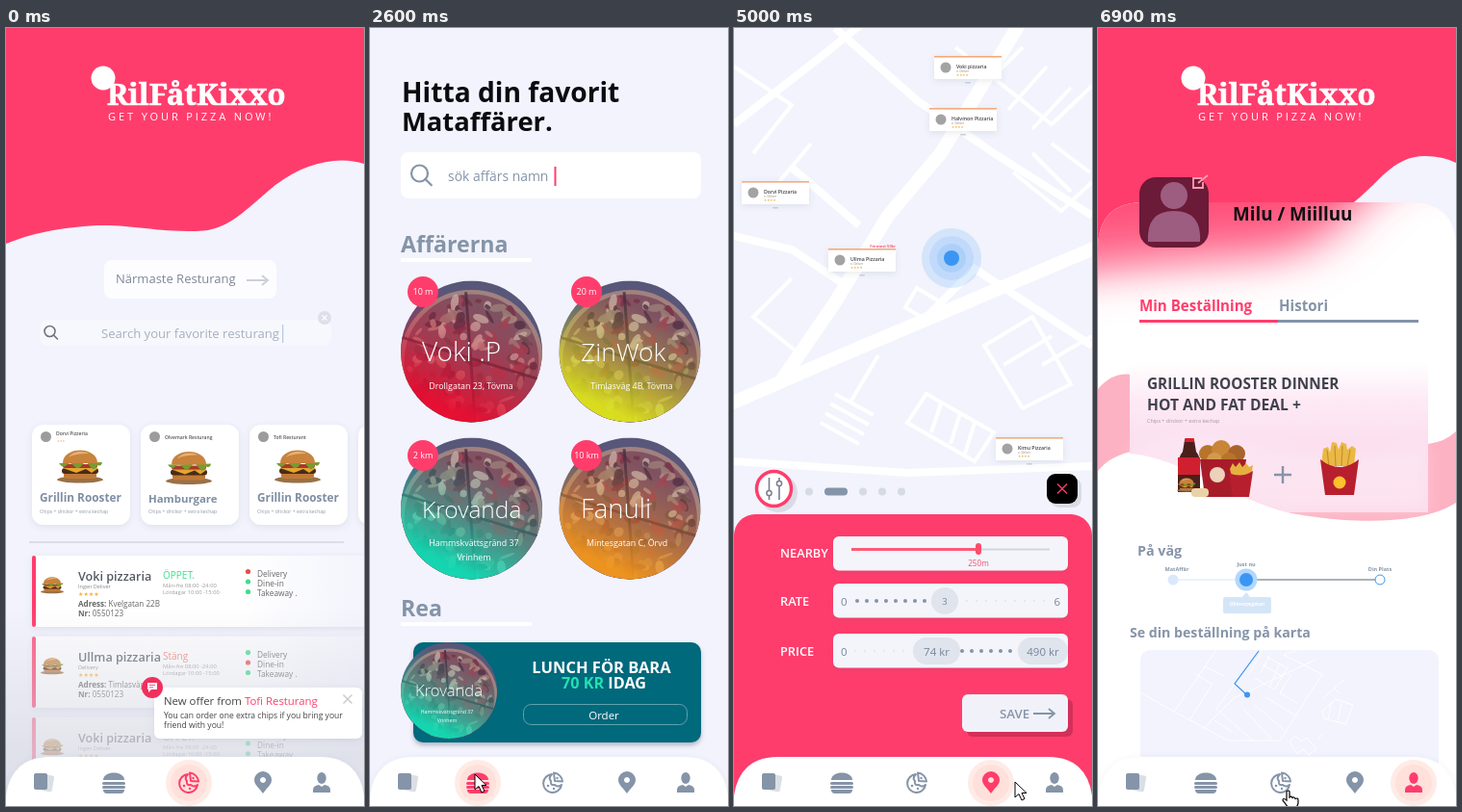
Animation of 372 by 808 pixels, one loop 7200 ms. Source, as an HTML page:

```html
<!DOCTYPE html>
<html lang="sv">
<head>
<meta charset="utf-8">
<title>Pizza app</title>
<style>
html, body { margin: 0; width: 100%; height: 100%; overflow: hidden; background: #f2f3fc; }
svg { display: block; font-family: "Open Sans", "Noto Sans", sans-serif; }
text { white-space: pre; }
.b { font-weight: 700; }
.s { font-weight: 600; }
.l { font-weight: 300; }
.m { text-anchor: middle; }
.e { text-anchor: end; }
.logo { font: 900 31px "Noto Serif", serif; stroke: #fff; stroke-width: .7; }
</style>
</head>
<body>
<svg id="stage" width="372" height="808" viewBox="0 0 372 808"></svg>
<script>
const PINK = '#ff3d6c', GREY = '#8594a8', BG = '#f2f3fc', BLUE = '#3b96f3', GREEN = '#3fdc8c';
const LOOP = 7200, STEP = 100, FADE = 380;

const text = (x, y, size, str, fill = GREY, cls = '') =>
  `<text x="${x}" y="${y}" font-size="${size}" fill="${fill}" class="${cls}">${str}</text>`;
const rect = (x, y, w, h, r, fill, extra = '') =>
  `<rect x="${x}" y="${y}" width="${w}" height="${h}" rx="${r}" fill="${fill}" ${extra}/>`;
const dot = (x, y, r, fill, extra = '') => `<circle cx="${x}" cy="${y}" r="${r}" fill="${fill}" ${extra}/>`;
const shape = (d, fill, extra = '') => `<path d="${d}" fill="${fill}" ${extra}/>`;
const line = (d, stroke, w, extra = '') => `<path d="${d}" fill="none" stroke="${stroke}" stroke-width="${w}" ${extra}/>`;
const at = (x, y, body, k = 1) => `<g transform="translate(${x} ${y}) scale(${k})">${body}</g>`;
const dots = (x, y, n, step, r, fill) => Array.from({ length: n }, (_, i) => dot(x + i * step, y, r, fill)).join('');
const SHADOW = 'filter="url(#shadow)"';

// Shared artwork
const tints = { red: '#ea0c30', yellow: '#dde31c', teal: '#0fdcb4', orange: '#f2961c' };
const stops = (...list) => list.map(([o, c, a = 1]) => `<stop offset="${o}" stop-color="${c}" stop-opacity="${a}"/>`).join('');
const gradient = (id, list, dir = 'x2="0" y2="1"') => `<linearGradient id="${id}" ${dir}>${stops(...list)}</linearGradient>`;

function toppings() {
  let seed = 7, out = '';
  const rnd = () => (seed = seed * 16807 % 2147483647) / 2147483647;
  const tones = ['#cf9a8a', '#84303f', '#dfc0ae', '#58303e', '#b04450', '#b08a7a', '#6f4a48'];
  for (let i = 0; i < 130; i++) {
    const a = rnd() * 6.28, d = Math.sqrt(rnd()) * 88;
    out += `<ellipse rx="${4 + rnd() * 9}" ry="${2 + rnd() * 5}" fill="${tones[i % 7]}" opacity=".85"
      transform="translate(${d * Math.cos(a)} ${14 + d * Math.sin(a)}) rotate(${rnd() * 180})"/>`;
  }
  return out;
}
const pizza = (x, y, r, tint) => at(x, y,
  `<g clip-path="url(#disc)"><use href="#pizza"/>${dot(0, 0, 100, `url(#${tint})`)}</g>`, r / 100);

const burger = (x, y, w) => at(x, y,
  `<ellipse cy="15" rx="24" ry="3.5" fill="#9a7047"/>` +
  rect(-17, 7, 34, 7, 3, '#c07a38') + rect(-19, 3, 38, 6, 3, '#4a2a1a') +
  shape('M-18 3H19L12 8L6 4L-4 8Z', '#e5a52e') + rect(-18, -1, 36, 4, 2, '#a83a28') +
  shape('M-22 -2q4 6 8 2t8 1t8 -1t8 1t8 -1q4 2 5 -3z', '#7a9a32') +
  shape('M-18 -2C-18 -20 18 -20 18 -2Z', '#c8833c') + shape('M-12 -8C-8 -15 4 -15 9 -12C0 -12 -8 -11 -12 -8Z', '#e6b274'), w / 48);

const arrow = (x, y, c, w) => line(`M${x} ${y}h22m-6 -5l6 5l-6 5`, c, w);
const cross = (x, y, r, c, w) => line(`M${x - r} ${y - r}l${2 * r} ${2 * r}m0 ${-2 * r}l${-2 * r} ${2 * r}`, c, w);
const lens = (x, y, r, c, w) => line(`M${x + r * .7} ${y + r * .7}l${r * .75} ${r * .75}`, c, w, 'stroke-linecap="round"') +
  dot(x, y, r, 'none', `stroke="${c}" stroke-width="${w}"`);
const stars = (x, y, s, n = 4) => text(x, y, s, '★'.repeat(n), '#f5b041');

const icons = [
  c => rect(-2, -9, 12, 17, 2, c, 'opacity=".3" transform="rotate(10)"') + rect(-10, -10, 14, 17, 2, c),
  c => shape('M-11 -3C-11 -13 11 -13 11 -3Z', c) + rect(-12, -1, 24, 3, 1.5, c) + rect(-12, 3, 24, 3, 1.5, c) +
    shape('M-11 7H11Q11 11 7 11H-7Q-11 11 -11 7Z', c),
  c => line('M-1 -9A9.5 9.5 0 1 0 9 2Q5 5 2 2Q-3 3 -2 -2Q-5 -5 -1 -9ZM1 -10.5A10 10 0 0 1 10 -1.5L2 -2Z', c, 2, 'stroke-linejoin="round"') +
    dot(-5, 3, 1.3, c) + dot(1, 6, 1.2, c) + dot(4.5, -5, 1.2, c),
  c => shape('M0 11C-4 5 -9 2 -9 -3A9 9 0 0 1 9 -3C9 2 4 5 0 11ZM0 -6a3 3 0 1 0 .01 0Z', c, 'fill-rule="evenodd"'),
  c => `<ellipse cy="-5" rx="4.7" ry="6" fill="${c}"/>` + shape('M-9 10V7Q-9 3 -3 2L0 4L3 2Q9 3 9 7V10Z', c)
];
const nav = (active, personX = 328) =>
  shape('M0 808V797Q6 757 46 757H326Q366 757 372 797V808Z', '#fff', SHADOW) +
  [39, 112, 190, 267, personX].map((x, i) => at(x, 784,
    (i === active ? dot(0, 0, 24, '#ffebe6') + dot(0, 0, 19, '#ffe0da') : '') + icons[i](i === active ? PINK : GREY))).join('');

const logo = x => dot(x - 4, 52, 12.5, '#fff') + text(x, 80, 31, 'RilFåtKixxo', '#fff', 'logo') +
  `<g letter-spacing="2.9">${text(x + 1, 96, 11, 'GET YOUR PIZZA NOW!', '#fff')}</g>`;

const track = y => at(0, y,
  line('M78 0H154', '#d6e8fb', 1.2) + line('M154 0H293', '#5d6470', 1.2) +
  dot(78, 0, 5.5, '#d9e9fb') + dot(154, 0, 11.5, '#b3d7fb') + dot(154, 0, 7, BLUE) +
  dot(293, 0, 5, '#fff', `stroke="${BLUE}"`) +
  text(82, -9, 5.5, 'MatAffär', GREY, 'b m') + text(154, -14, 5.5, 'Just nu', GREY, 'b m') + text(293, -9, 5.5, 'Din Plats', GREY, 'b m') +
  shape('M149 19l5 -6l5 6Z', '#d5e5f8') + rect(130, 18, 50, 17, 2, '#d5e5f8') + text(155, 27, 4.8, 'Ollevarpsgatan', '#fff', 'b m'));

const streets = (w, dotSize) =>
  line(`M33 391L68 411L124 441H178L222 372L182 352L196 347M68 411L112 347M90 372L108 382L84 420M100 364L120 374
    M98 429L130 397L215 357M131 382L112 408L150 441M140 408L170 440M152 404L182 430M163 396L196 416M110 420L128 432
    M146 372L160 347M152 376L172 388L186 366L164 354M160 362L180 374M168 352L158 370M178 360L168 384M190 372L178 392L196 402
    M222 398L244 378M234 386L240 392M222 410L236 398L254 404L246 424L224 418ZM232 400L228 419M242 402L238 422
    M188 442L194 436L200 442L206 438L216 450L208 456L202 450L196 455ZM218 440L222 434`, '#fff', w) +
  line('M156 348L131 382L144 394', BLUE, 1.2) + dot(144, 393.5, dotSize, BLUE);

// Pages
function home() {
  const card = (x, name, title, size, dy, by) => rect(x, 412, 102, 104, 12, '#fff', SHADOW) +
    dot(x + 14.5, 424.5, 5.5, '#9c9c9c') + text(x + 25, by, 5, name, '#555', 's') + burger(x + 50, 454 + dy, 48) +
    text(x + 8, 491.5 + dy, size, title, '#7f8ea3', 'b') + text(x + 8, 504, 5.1, 'Chips + drickor + extra kechap', '#8f98a5');
  const item = (y, name, sub, state, color, address, lights, fade) => `<g transform="translate(0 ${y})" opacity="${fade}">` +
    rect(27, 0, 360, 74, 4, 'url(#row)', SHADOW) + rect(27, 0, 4, 74, 2, PINK) + burger(48, 30, 24) +
    text(75, 26, 12.6, name, '#555b66', 's') + text(75, 34, 5.5, sub, '#888') + stars(75, 42, 6) +
    text(75, 53, 8.1, `<tspan class="b">Adress:</tspan> ${address}`, '#666') +
    text(75, 63, 8.1, '<tspan class="b">Nr:</tspan> 0550123', '#666') + text(163, 24, 10, state, color) +
    text(163, 33, 5.8, 'Mån-fre 08:00 -24:00', '#999') + text(163, 40, 5.8, 'Lördagar 10:00 -15:00', '#999') +
    ['Delivery', 'Dine-in', 'Takeaway .'].map((s, i) =>
      dot(251.5, 16.5 + i * 10.5, 2.6, lights[i] === 'r' ? '#ee4b4b' : GREEN) + text(261, 22 + i * 10, 8.3, s, '#666')).join('') + '</g>';
  return rect(0, 0, 372, 808, 0, BG) +
    shape('M0 0H372V141C345 132 310 140 280 163C245 192 230 211 197 211C150 211 130 204 95 205C55 207 25 214 0 224Z', PINK) +
    logo(105) + rect(102, 241, 179, 40, 8, '#fdfdff') + text(114, 265, 13, 'Närmaste Resturang', '#7d8796') + arrow(250, 262, '#ccd0d8', 2) +
    rect(35, 303, 303, 27, 8, '#fff', 'opacity=".35"') + lens(45.5, 315, 5.5, '#6f7580', 1.6) +
    text(99, 322, 13.1, 'Search your favorite resturang', '#a6b0bf') +
    `<g id="caret">${rect(287, 308, 1.2, 19, 0, '#b3c8de')}</g>` + dot(331, 301, 7, '#dde0e9') + cross(331, 301, 2.5, '#fff', 1.2) +
    card(27, 'Dorvi Pizzeria', 'Grillin Rooster', 11.8, 0, 423) + stars(53, 430, 3, 3) +
    card(140, 'Olvemark Resturang', 'Hamburgare', 11.4, 1.5, 426.5) +
    card(253, 'Tofi Resturant', 'Grillin Rooster', 11.8, 0, 426.5) + rect(366, 412, 102, 104, 12, '#fff', SHADOW) +
    line('M24 534H351', '#d3d6e1', 1.5) +
    item(548, 'Voki pizzaria', 'Ingen Deliver', 'ÖPPET.', GREEN, 'Kvelgatan 22B', 'rgg', 1) +
    item(632, 'Ullma pizzaria', 'Delivery', 'Stäng', '#f07a6a', 'Timlasväg 4B', 'grg', .8) +
    item(716, 'Voki pizzaria', 'Ingen Deliver', 'ÖPPET.', GREEN, 'Kvelgatan 22B', 'rgg', .6) +
    rect(0, 600, 372, 208, 0, 'url(#haze)') +
    rect(154, 685, 216, 53, 6, '#fff', SHADOW) + dot(152, 685, 11, '#f0305f') +
    shape('M147 680H157V687H151L148 690V687H147Z', '#fff') + line('M149 682.5H155M149 684.8H153', '#f0305f', .8) +
    text(164, 703, 11.4, `New offer from <tspan fill="${PINK}">Tofi Resturang</tspan>`, '#444') +
    text(164, 717, 8.55, 'You can order one extra chips if you bring your', '#444') + text(164, 727, 8.55, 'friend with you!', '#444') +
    cross(355, 697, 4.5, '#ccc', 1.5) + nav(2);
}

function stores() {
  const badge = (x, y, s) => dot(x, y, 16, PINK) + text(x, y + 3, 9, s, '#fff', 'm');
  const store = (x, y, tint, name, size, nameX, lines, mid) => pizza(x, y, 73.5, tint) +
    text(nameX, y + 9.5, size, name, '#fff', 'l') +
    lines.map((s, i) => text(mid, y + 39 + i * 14.5, 8.9, s, '#fff', 'm')).join('');
  const heading = (y, s) => text(32, y, 23.2, s, GREY, 'b') + rect(32, y + 6, 136, 4, 0, '#fff');
  return rect(0, 0, 372, 808, 0, BG) +
    text(33, 76.6, 28.2, 'Hitta din favorit', '#0b0b10', 'b') + text(33, 106.6, 27.4, 'Mataffärer.', '#0b0b10', 'b') +
    rect(32, 129, 312, 48, 8, '#fff') + lens(51.5, 151, 8.5, GREY, 2.2) + text(81, 158.5, 13.9, 'sök affärs namn', GREY) +
    rect(191.5, 144, 2, 20, 0, PINK) + heading(233, 'Affärerna') +
    store(105.5, 336, 'red', 'Voki .P', 28, 54, ['Drollgatan 23, Tövma'], 105) +
    store(270, 336, 'yellow', 'ZinWok', 26.5, 219, ['Timlasväg 4B, Tövma'], 272) +
    store(105.5, 499, 'teal', 'Krovanda', 24.5, 54, ['Hammskvättsgränd 37', 'Vrinhem'], 108) +
    store(270, 499, 'orange', 'Fanuli', 27.5, 219, ['Mintesgatan C, Örvd'], 267) +
    badge(55, 274, '10 m') + badge(225, 274, '20 m') + badge(55, 444, '2 km') + badge(225, 444, '10 km') +
    heading(611, 'Rea') + rect(45, 638, 299, 104, 10, '#00697b', 'filter="url(#lift)"') + pizza(82, 688, 50, 'teal') +
    text(47, 694, 16.6, 'Krovanda', '#fff', 'l') + text(80, 712, 5.2, 'Hammskvättsgränd 37', '#fff', 'm') + text(80, 721, 5.2, 'Vrinhem', '#fff', 'm') +
    text(240.5, 670, 16.5, 'LUNCH FÖR BARA', '#fff', 'b m') + text(243, 686, 16.2, '<tspan fill="#24e0b0">70 KR</tspan> IDAG', '#fff', 'b m') +
    rect(159.5, 702.5, 170, 21, 8, 'none', 'stroke="#5fa2ae"') + text(243, 718, 11.5, 'Order', '#fff', 'm') + nav(1);
}

function order() {
  const rows = [['Produkt Namn:', 108, 'Grillin Rooster Meny', 241], ['Ordernr:', 76, '#453309338', 242],
    ['Affärsnamn:', 94, 'Voki Pitzzaria', 241], ['Address:', 76, 'Ollevarpsgatan', 242], ['Id:', 48, '#2', 244]];
  return rect(0, 0, 372, 808, 0, BG) +
    ['Här kan du se vart exakt', 'är din beställning på', 'väg.'].map((s, i) => text(40, 72 + i * 30, 23.3, s, '#0b0b10', 'b')).join('') +
    text(40, 194, 18.8, 'Nuvarande beställning!', GREEN, 'b') + rect(0, 209, 372, 80, 10, '#fff') + track(247) +
    text(33, 332, 13.8, 'Karta', GREY, 'b') + rect(33, 347, 310, 121, 10, '#6c6c6c') +
    `<g clip-path="url(#mapBox)">${streets(1.4, 4)}</g>` + text(42, 461, 9.3, 'Ordernr: #453309338', '#fff') +
    line('M186 502L148 557L194 594', BLUE, 5, 'stroke-linejoin="round"') + pizza(186, 502, 8.5, 'teal') +
    dot(194, 594, 11.5, '#b3d7fb') + dot(194, 594, 7.5, BLUE) +
    text(184, 491, 7.5, 'Delivery', GREY, 'm') + text(123, 560, 7.3, 'Gata', GREY, 'm') + text(222, 546, 7.3, 'Tiden', GREY, 'm') +
    text(192, 616, 7.5, 'Din plats', GREY, 'm') + rect(179, 550, 49, 19, 3, '#fff', 'stroke="#e9ebf3"') +
    text(203.5, 562.5, 7.8, '1 min left', '#24d6a0', 'b m') +
    line('M33 654.5H153M225 654.5H345', '#dcdfe8', 1) + text(189, 658, 9.2, 'info', GREY, 'b m') +
    rows.map(([k, x, v, vx], i) => text(33, 682 + i * 14, 9.4, k, GREY, 'b') +
      text(236, 682 + i * 14, 9.4, '.'.repeat((236 - x) / 2.69), GREY, 'b e') + text(vx, 682 + i * 14, 9.8, v, '#a9b9cf', 'b')).join('') + nav(0);
}

function map() {
  const pin = (x, y, name) => at(x, y, rect(0, 0, 70, 24, 1, '#fff', SHADOW) + rect(0, 0, 70, 1.6, 0, '#f5aa7c') +
    dot(12, 12, 5.5, '#a3a3a3') + text(23, 13, 5.2, name, '#444', 's') + text(23, 17, 3, 'o. Deliver', '#888') + stars(23, 21, 3.5) +
    rect(32, 27, 6, 1.5, .7, '#c9ccd4'));
  const field = y => rect(103, y, 244, 35.5, 6, '#f4f5fb', SHADOW);
  const label = (y, s) => text(48, y, 12.8, s, '#fff', 's');
  const knob = (x, y, w, s) => rect(x - w / 2, y - 14, w, 28, 14, '#dfe4ed') + text(x, y + 5, 11.5, s, '#77869b', 'm');
  const sliderKnob = 'stroke="#777f8c" stroke-width="1.5"';
  return rect(0, 0, 372, 808, 0, BG) +
    line('M-10 393L100 345L390 222M48 368L105 285L160 195L215 130L300 -10', '#fff', 14) +
    line('M105 0L190 75L270 130L372 195M0 100L90 30L140 -10M-5 215L60 230L120 270M60 145L130 205M200 300L250 250L372 330M0 450L180 462L372 455', '#fff', 8) +
    line(`M0 40L60 80L20 130M30 180L80 120M60 260L20 300L70 340M230 20L330 100L372 60M260 60L300 20M285 85L325 40M310 105L350 62
      M290 150L340 190L372 160M310 130L350 170M330 120L370 150M120 390L150 340M105 380L145 402M100 390L140 412M95 400L135 422M90 410L130 432
      M190 270L215 285L202 305L178 290ZM200 380L270 420L250 450L180 410ZM215 390L205 420M235 400L225 432M250 410L240 442
      M260 330L310 300L350 370L300 395ZM320 350L372 320M280 350L330 320`, '#fff', 4) +
    pin(208, 29, 'Voki pizzaria') + pin(203, 83, 'Halvmon Pizzaria') + pin(8, 159, 'Dorvi Pizzaria') + pin(98, 229, 'Ullma Pizzaria') +
    pin(272, 425, 'Kimu Pizzaria') + text(168, 228, 4.2, 'Förmest 50kr', PINK, 's e') +
    dot(226, 239, 31, BLUE, 'opacity=".16"') + dot(226, 239, 23, BLUE, 'opacity=".12"') + dot(226, 239, 15, BLUE, 'opacity=".14"') + dot(226, 239, 8, BLUE) +
    dot(46, 483, 20, '#d9dce5') + dot(41.5, 478.5, 18, '#fff', `stroke="${PINK}" stroke-width="3.5"`) +
    line('M36.5 467V480M36.5 486V490M47 467V470M47 476V490', '#777f8c', 1.6) +
    dot(36.5, 483, 2.6, '#fff', sliderKnob) + dot(47, 473, 2.6, '#fff', sliderKnob) +
    dot(78, 481.5, 4, '#d5dae4') + rect(94, 477.5, 24, 8, 4, GREY) + dots(134, 481.5, 3, 20, 4, '#d5dae4') +
    rect(329, 467, 32, 31, 9, '#d9dce5') + rect(325, 463, 32, 31, 9, '#000') + cross(341, 478.5, 5, PINK, 1.3) +
    rect(0, 505, 372, 340, 22, PINK) + label(550, 'NEARBY') + label(600, 'RATE') + label(652, 'PRICE') + field(528) + field(577) + field(629) +
    line('M122 541.5H328', '#d0d5de', 2) + line('M122 541.5H254', '#ff5a75', 3) + rect(251, 535, 6, 12, 3, '#ff4d6a') +
    text(254, 559, 8.2, '250m', '#f0506e', 'm') +
    text(111, 600, 11.5, '0', '#77869b') + dots(128, 595, 8, 10, 2, GREY) + dots(242, 595, 9, 10, 1.2, '#e4e8f0') +
    dot(219, 595, 14, '#dfe4ed') + text(219, 599, 9.5, '3', '#77869b', 'm') + text(332.5, 600, 11.5, '6', '#77869b') +
    text(111, 652, 11.5, '0', '#77869b') + dots(126, 647, 6, 10, 1.2, '#e4e8f0') + dots(237, 647, 6, 10, 2, GREY) +
    knob(210.5, 647, 49, '74 kr') + knob(321, 647, 52, '490 kr') +
    rect(242, 697, 110, 39, 6, '#d2305a') + rect(237, 692, 110, 39, 6, '#f1f2f9') + text(276, 717, 13.3, 'SAVE', GREY, 's') + arrow(311, 712, GREY, 1.8) +
    nav(3, 333);
}

function profile() {
  return rect(0, 0, 372, 808, 0, '#fff') + rect(0, 0, 372, 240, 0, PINK) +
    shape('M262 184C292 162 305 133 340 133Q358 133 372 140V240H262Z', BG) +
    `<g clip-path="url(#sheet)">${rect(0, 181, 372, 200, 0, '#fff') +
      shape('M-80 100H420V150C345 130 310 140 280 173C250 210 220 236 160 240C100 244 30 250 -80 268Z', PINK, 'filter="url(#frost)"') +
      rect(0, 181, 372, 200, 0, 'url(#panel)')}</g>` + logo(103) +
    rect(43, 155, 72, 73, 17, '#6b1a37') + dot(79, 174, 14, '#9d5d80') + shape('M52 222Q50 190 79 190Q108 190 106 222Z', '#9d5d80') +
    line('M108 156H99V166H109V160M104 161L114 153', '#ff9db4', 1.8) +
    text(140, 200, 18.8, 'Milu / Miilluu', '#101014', 'b') +
    text(43, 294, 15.1, 'Min Beställning', PINK, 'b') + text(188, 294, 15.1, 'Histori', GREY, 'b') +
    rect(187, 303, 146, 3, 0, GREY) + rect(43, 303, 144, 3, 0, PINK) +
    shape('M0 375C10 363 22 358 34 360V440C18 444 8 450 0 460Z', '#fdb2c3') +
    shape('M343 432Q360 430 372 419V493C340 514 270 518 190 502L343 490Z', '#fdb2c3') +
    rect(33, 347, 310, 156, 0, 'url(#deal)') +
    shape('M33 437C70 420 130 425 200 438C250 444 310 440 343 432V503H190C150 495 90 500 33 503Z', '#fff', 'opacity=".25" filter="url(#soft)"') +
    shape('M33 442C90 447 140 490 200 504H33Z', '#fff') +
    text(51, 375, 15.3, 'GRILLIN ROOSTER DINNER', '#41414e', 'b') + text(51, 397, 15.6, 'HOT AND FAT DEAL +', '#41414e', 'b') +
    text(51, 410, 5.4, 'Chips + drickor + extra kechap', '#a098a4') +
    shape('M90 428H100L102 440Q107 446 106 455V482H83V456Q83 446 88 440Z', '#4b1f1a') + rect(83, 446, 23, 18, 0, '#d02030') + rect(90, 426, 10, 4, 1, '#d5202d') +
    dot(114, 442, 9, '#b8742c') + dot(128, 438, 10, '#c98538') + dot(144, 442, 9, '#a8642a') + dot(121, 449, 8, '#d49a4c') + dot(136, 449, 8, '#b8742c') +
    shape('M106 448H154L148 487H111Z', '#a81c2a') + dot(124, 464, 8, '#ecd2ba') +
    shape('M137 458l3 -6l3 4l4 -5l3 5l4 -4l3 4l4 -2l-2 12H139Z', '#e5b040') + shape('M136 462Q149 468 161 460L157 487H140Z', '#b81f2e') +
    burger(92, 474, 20) + rect(97, 478, 18, 9, 4, '#e8d3a8') +
    line('M183 464H201M192 455V473', GREY, 2.4) +
    shape('M232 455l2 -18l5 -2l2 6l2 -11l5 1l2 7l3 -8l5 2l1 6l5 -4l4 3l-2 18Z', '#eab945') +
    line('M238 438L240 455M246 434L247 455M254 434L253 455M262 438L259 455', '#c98f2a', 1.2) +
    shape('M231 448Q251 464 271 448L266 485H236Z', '#b81f2e') + dot(251, 472, 6.5, '#fbc02d') +
    text(41, 548, 14.3, 'På väg', GREY, 'b') + track(573) + text(33, 633, 14.15, 'Se din beställning på karta', GREY, 'b') +
    rect(44, 646, 310, 180, 10, BG) + at(11, 299, streets(1, 3)) + nav(4);
}

const defs = `<defs>
  <filter id="shadow" x="-20%" y="-20%" width="140%" height="150%"><feDropShadow dx="0" dy="2" stdDeviation="3" flood-color="#5a6080" flood-opacity=".13"/></filter>
  <filter id="lift" x="-20%" y="-20%" width="140%" height="150%"><feDropShadow dx="0" dy="3" stdDeviation="2" flood-color="#404860" flood-opacity=".35"/></filter>
  <filter id="soft"><feGaussianBlur stdDeviation="8"/></filter>
  <filter id="frost" x="-20%" y="-40%" width="140%" height="200%"><feGaussianBlur stdDeviation="24"/></filter>
  <clipPath id="disc"><circle r="100"/></clipPath>
  <clipPath id="sheet"><path d="M0 229Q0 181 48 181H324Q372 181 372 229V381H0Z"/></clipPath>
  <clipPath id="mapBox"><rect x="33" y="347" width="310" height="121" rx="10"/></clipPath>
  <g id="pizza">${rect(-100, -100, 200, 200, 0, '#5c5b7d') + dot(0, 14, 98, '#8d5560', 'stroke="#b98f84" stroke-width="6"') + toppings() +
    line('M-8 -84L6 110M-98 -20L98 40', '#482836', 4, 'opacity=".8"') + dot(0, 0, 100, '#474668', 'opacity=".2"')}</g>
  ${Object.entries(tints).map(([id, c]) => gradient(id, [[.2, c, 0], [.55, c, .35], [.9, c, .95]], 'x1=".75" y1=".05" x2=".3" y2="1"')).join('')}
  ${gradient('row', [[0, '#fff'], [.6, '#fff'], [1, BG]], '')}
  ${gradient('haze', [[0, '#d0d2dc', 0], [.75, '#d0d2dc', .55], [1, '#d0d2dc', .55]])}
  ${gradient('panel', [[0, '#fff', .1], [.35, '#fff', .25], [.8, '#fff', 1]])}
  ${gradient('deal', [[0, '#fff'], [.25, '#fdeaf5'], [.6, '#fbdcee'], [1, '#fbd9e8']])}
</defs>`;

const pointers = `<g id="pointer">
  ${shape('M0 0V16L4 12.5L7 19L10 17.5L7 11.5H12Z', '#fff', 'id="arrow" stroke="#000"')}
  ${shape('M0 1Q2 -1 3 1V7Q5 5 6 7.5Q8 6 9 8.5Q12 7 12 10V13Q11 17 9 18H2Q-1 14 -4 10Q-4 7 0 10Z', '#fff', 'id="hand" stroke="#000" stroke-width="1.2"')}
</g>`;

const stage = document.getElementById('stage');
stage.innerHTML = defs + [home, stores, order, map, profile].map(p => `<g class="page">${p()}</g>`).join('') + pointers;
const pages = [...stage.querySelectorAll('.page')];
const [caret, pointer, arrowTip, hand] = ['caret', 'pointer', 'arrow', 'hand'].map(id => document.getElementById(id));

// Time at which each page starts to dissolve in
const starts = [-FADE, 2180, 3220, 4600, 5840];
// Pointer path: time, x, y
const pointerPath = [[400, 380, 720], [1100, 300, 780], [1900, 109, 775], [2600, 109, 775], [2900, 47, 782], [3500, 47, 782],
  [4200, 277, 787], [4800, 277, 787], [5000, 292, 783], [5700, 330, 785], [6300, 330, 785], [6900, 196, 792]];
const handTimes = [[1800, 2180], [2900, 3300], [4100, 4700], [5600, 5840], [6800, LOOP]];

function pointerAt(t) {
  const i = pointerPath.findIndex(p => p[0] > t);
  if (i < 1) return pointerPath.at(i).slice(1);
  const [t0, x0, y0] = pointerPath[i - 1], [t1, x1, y1] = pointerPath[i];
  const u = (t - t0) / (t1 - t0), k = u * u * (3 - 2 * u);
  return [x0 + (x1 - x0) * k, y0 + (y1 - y0) * k];
}

function draw(now) {
  const t = Math.floor(now % LOOP / STEP) * STEP;
  pages.forEach((page, i) => {
    const alpha = Math.min(1, Math.max(0, (t - starts[i]) / FADE));
    const covered = t >= starts[i + 1] + FADE;
    page.style.display = alpha && !covered ? '' : 'none';
    page.setAttribute('opacity', alpha);
  });
  caret.setAttribute('opacity', t % 800 < 400 ? 1 : 0);
  const isHand = handTimes.some(([a, b]) => t >= a && t < b);
  pointer.style.display = t < 400 ? 'none' : '';
  pointer.setAttribute('transform', `translate(${pointerAt(t)})`);
  arrowTip.style.display = isHand ? 'none' : '';
  hand.style.display = isHand ? '' : 'none';
  requestAnimationFrame(draw);
}
draw(performance.now());
</script>
</body>
</html>
```
